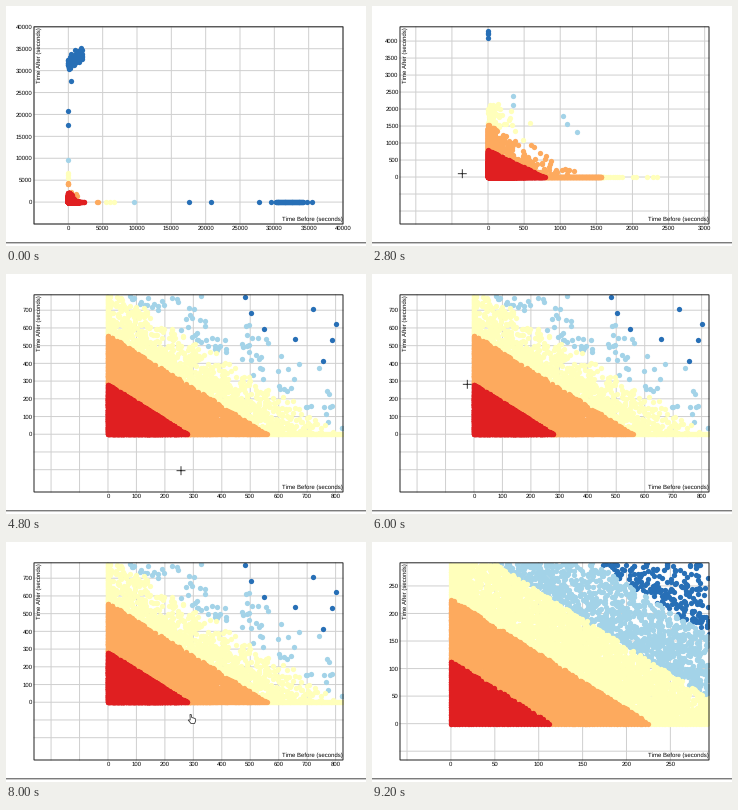
These frames come from a looping animation (360 px wide and 240 px high, 9600 ms). A matplotlib script:

```python
import numpy as np
import matplotlib.pyplot as plt
from matplotlib.animation import FuncAnimation
from matplotlib.patches import Polygon, Rectangle

plt.rcParams["text.hinting"] = "none"
plt.rcParams["text.hinting_factor"] = 1

W, H, DPI = 360, 240, 80
PT = 72 / DPI  # points per pixel
LEFT, RIGHT, TOP, BOTTOM = 28, 337, 20.8, 218
COLORS = ["#e01f21", "#fdaa5e", "#ffffbb", "#a3d3e8", "#276fb6"]
FRAMES, INTERVAL = 24, 400

# first frame, x range, y range, tick step, width of a colour band in x + y
VIEWS = [
    (0, (-5000, 40000), (-5000, 40000), 5000, 2450),
    (6, (-1219, 3060), (-1382, 4420), 500, 783),
    (12, (-260, 826), (-326, 787), 100, 280),
    (21, (-58, 294), (-66, 292), 50, 113.5),
]

rng = np.random.default_rng(7)


def dense_cloud():
    """Points whose density decays with the sum of both times."""
    sums = np.arange(1, 1450)
    density = np.minimum(0.25, 0.08 * np.exp((330 - sums) / 128)) + 8e-5
    weight = sums * density
    s = rng.choice(sums, int(weight.sum()), p=weight / weight.sum())
    s = s + rng.random(s.size)
    share = rng.random(s.size)
    x, y = s * share, s * (1 - share)
    tilt = (s < 800) | (rng.random(s.size) < 1.15 - 0.8 * share)
    corner = (s > 1120) & (x < 835) & (y < 800)
    return np.column_stack([x, y])[tilt & ~corner]


def on_axis(values):
    return np.column_stack([values, np.zeros(len(values))])


def make_points():
    # Rare long runs appear on both axes
    far = on_axis([4200, 4300, 5500, 6100, 6700, 9600, 17500, 20800])
    fast_after = on_axis(np.r_[27800, 29500, 34800, 35500,
                               np.linspace(30200, 34200, 60)])
    axis_run = np.r_[np.linspace(0, 1600, 500), np.linspace(1600, 1850, 9),
                     rng.uniform(1900, 2390, 5)]
    edge = np.column_stack([rng.exponential(110, 130),
                            800 + 1400 * rng.random(130) ** 1.4])
    x = 2000 * rng.random(110) ** 2
    slow_after = np.column_stack([x, 31700 + 1.1 * x
                                  + rng.normal(0, 750, x.size)])
    outliers = [
        (350, 27700), (0, 4230), (0, 4100),
        (340, 2390), (1045, 1790), (1090, 1560), (1230, 1330),
        (483, 776), (504, 684), (547, 594), (722, 708),
        (800, 623), (656, 538), (789, 533), (754, 414)]
    return np.vstack([
        dense_cloud(), edge, slow_after, outliers, fast_after,
        far, far[:, ::-1], on_axis(axis_run),
        on_axis(np.linspace(0, 1450, 480))[:, ::-1]])


fig = plt.figure(figsize=(W / DPI, H / DPI), dpi=DPI, facecolor="white")
ax = fig.add_axes([0, 0, 1, 1])
ax.set_xlim(0, W)
ax.set_ylim(H, 0)
ax.axis("off")


def line(xs, ys, color, zorder=1):
    return ax.plot(xs, ys, color=color, lw=PT, zorder=zorder, snap=False)[0]


def label(x, y, text, size=6.15, **kw):
    return ax.text(x, y, text, fontsize=size * PT, color="black", zorder=6,
                   family="Liberation Sans", **kw)


def build_view(points, xlim, ylim, step, band):
    def to_x(v):
        return np.interp(v, xlim, (LEFT, RIGHT), left=-99, right=999)

    def to_y(v):
        return np.interp(v, ylim, (BOTTOM, TOP), left=999, right=-99)

    artists = []
    for value in step * np.arange(-2, 9):
        x, y = to_x(value), to_y(value)
        if LEFT <= x <= RIGHT:
            artists.append(line([x, x], [TOP, BOTTOM], "#d0d0d0"))
            if value >= 0:
                artists.append(label(x, 224, str(value), ha="center",
                                     va="baseline"))
        if TOP <= y <= BOTTOM:
            artists.append(line([LEFT, RIGHT], [y, y], "#d0d0d0"))
            if value >= 0:
                artists.append(label(26.6, y + 2.1, str(value), ha="right",
                                     va="baseline"))

    xs, ys = to_x(points[:, 0]), to_y(points[:, 1])
    inside = (xs >= LEFT) & (xs <= RIGHT) & (ys >= TOP)
    group = np.minimum(points.sum(axis=1) // band, 4)
    for g in reversed(range(5)):
        pick = inside & (group == g)
        dots, = ax.plot(xs[pick], ys[pick], "o", ms=5.3 * PT, mew=0,
                        color=COLORS[g], zorder=3)
        dots.set_clip_path(plot_area)
        artists.append(dots)
    return artists


plot_area = ax.add_patch(Rectangle(
    (LEFT, TOP), RIGHT - LEFT, BOTTOM - TOP, fill=False, ec="#222222",
    lw=PT, zorder=5, snap=False))
line([0, W], [236.8, 236.8], "#444444")
label(337, 215, "Time Before (seconds)", 5.7, ha="right", va="baseline")
label(35.7, 21.3, "Time After (seconds)", 5.7, rotation=90, ha="right",
      va="top")

cloud = make_points()
views = [build_view(cloud, *spec) for _, *spec in VIEWS]

# Pointer shapes, centred on the origin
CROSS = np.array([(-4, 0), (4, 0), (np.nan, np.nan), (0, -4), (0, 4)])
HEAD = np.array([(0, 3.5), (3.5, 3.5), (3.5, 0), (3.5, 3.5)])
RESIZE = np.vstack([HEAD, -HEAD[::-1]])
HAND = np.array([(-2, -4.5), (-0.8, -4.5), (-0.3, -1.5), (3.2, -0.5),
                 (3.6, 2), (2.6, 4.5), (-1, 4.5), (-3.8, 1), (-1.8, 1)])
stroke = line([], [], "#222222", zorder=8)
hand = ax.add_patch(Polygon(HAND, fc="white", ec="#333333", lw=0.8 * PT,
                            zorder=8))

# frame, x, y of the pointer's turning points
PATH = np.array([(3, 54, 177), (5, 84, 203), (7, 90.3, 167.7), (8, 97, 144),
                 (10, 175, 196.7), (12, 175, 196.7), (15, 95.3, 110.3),
                 (20, 186, 177)])


def pointer_shape(i):
    if i < 2 or i >= 22:
        return None
    if i >= 20:
        return "hand"
    return "resize" if i in (4, 5) or i > 15 else "cross"


def update(i):
    current = sum(i >= view[0] for view in VIEWS) - 1
    for k, artists in enumerate(views):
        for artist in artists:
            artist.set_visible(k == current)

    shape = pointer_shape(i)
    position = [np.interp(i, PATH[:, 0], PATH[:, c]) for c in (1, 2)]
    hand.set_visible(shape == "hand")
    hand.set_xy(HAND + position)
    stroke.set_visible(shape in ("cross", "resize"))
    stroke.set_data(*((RESIZE if shape == "resize" else CROSS) + position).T)
    stroke.set_linewidth((1.5 if shape == "resize" else 0.9) * PT)
    return []


anim = FuncAnimation(fig, update, frames=FRAMES, interval=INTERVAL,
                     repeat=True, repeat_delay=0)
plt.show()
```
